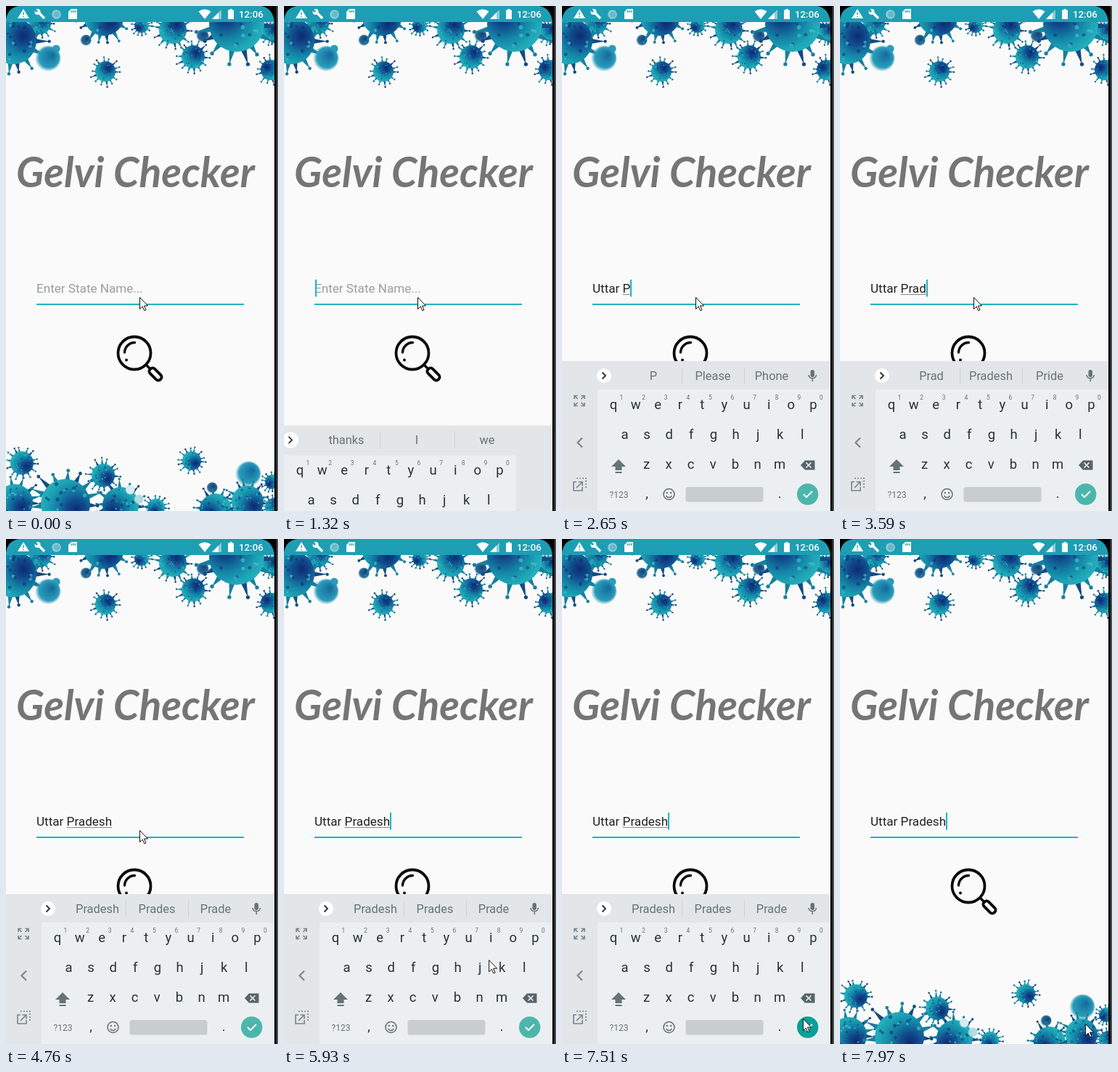
Recreate the animation shown at these times as an HTML page with a canvas. Size 375 by 694 pixels, loop 8000 ms.

```html
<!DOCTYPE html>
<html lang="en">
<head>
<meta charset="utf-8">
<title>State search</title>
<style>
  html, body { margin: 0; width: 100%; height: 100%; overflow: hidden; background: #fafafa; }
  canvas { display: block; }
</style>
</head>
<body>
<canvas width="375" height="694"></canvas>
<script>
const canvas = document.querySelector('canvas');
let ctx = canvas.getContext('2d');
const LOOP = 8000, TAU = Math.PI * 2;
const GREY = '#667378', INK = '#263238', TEAL = '#21b2c2';

// ---------- drawing helpers ----------
function text(str, x, y, size, color, align = 'left', style = '', family = 'Roboto') {
  ctx.font = `${style} ${size}px ${family}, sans-serif`;
  ctx.fillStyle = color;
  ctx.textAlign = align;
  ctx.fillText(str, x, y);
}
function rect(x, y, w, h, color) {
  ctx.fillStyle = color;
  ctx.fillRect(x, y, w, h);
}
function disc(x, y, r, color) {
  ctx.fillStyle = color;
  ctx.beginPath();
  ctx.arc(x, y, r, 0, TAU);
  ctx.fill();
}
function fillPath(d, color, x = 0, y = 0) {
  ctx.save();
  ctx.translate(x, y);
  ctx.fillStyle = color;
  ctx.fill(new Path2D(d), 'evenodd');
  ctx.restore();
}
function strokePath(d, color, width, x = 0, y = 0) {
  ctx.save();
  ctx.translate(x, y);
  ctx.strokeStyle = color;
  ctx.lineWidth = width;
  ctx.stroke(new Path2D(d));
  ctx.restore();
}
function random(seed) {
  return () => {
    seed = (seed * 16807 + 11) % 2147483647;
    return seed / 2147483647;
  };
}

// ---------- static scenery ----------
// shade: direction of the dark side, in turns
function virus(x, y, r, shade = 0.85) {
  const rnd = random(Math.round(x * 91 + y * 37 + 5000));
  const spikes = r > 25 ? 15 : 14;
  for (let i = 0; i < spikes; i++) {
    const a = (i + rnd() * 0.5) / spikes * TAU;
    const reach = r * (1.25 + rnd() * 0.3);
    const c = Math.cos(a), s = Math.sin(a), w = Math.max(1.2, r * 0.11);
    ctx.fillStyle = i % 3 ? '#187f9e' : '#154a80';
    ctx.beginPath();
    ctx.moveTo(x + c * r * 0.92 - s * w, y + s * r * 0.92 + c * w);
    ctx.lineTo(x + c * reach, y + s * reach);
    ctx.lineTo(x + c * r * 0.92 + s * w, y + s * r * 0.92 - c * w);
    ctx.fill();
    disc(x + c * reach, y + s * reach, Math.max(1.3, r * 0.07), ctx.fillStyle);
  }
  const cx = x + Math.cos(shade * TAU) * r * 0.5, cy = y + Math.sin(shade * TAU) * r * 0.5;
  const body = ctx.createRadialGradient(cx, cy, 0, cx, cy, r * 1.5);
  body.addColorStop(0, '#0c2a72');
  body.addColorStop(0.25, '#114a8c');
  body.addColorStop(0.55, '#1483a6');
  body.addColorStop(0.8, '#1ca3b5');
  body.addColorStop(1, '#25b2be');
  disc(x, y, r, body);
  for (let i = 0; i < 22; i++) {
    const a = rnd() * TAU, d = Math.sqrt(rnd()) * r * 0.88;
    disc(x + Math.cos(a) * d, y + Math.sin(a) * d, r * (0.04 + rnd() * 0.04),
      i % 3 ? 'rgba(10,52,108,.6)' : 'rgba(75,200,212,.6)');
  }
}
function softCell(x, y, r, rim = '#2a9cba', core = rim) {
  const glow = ctx.createRadialGradient(x + r * 0.35, y - r * 0.3, 0, x, y, r);
  glow.addColorStop(0, core);
  glow.addColorStop(0.78, rim);
  glow.addColorStop(1, rim + '00');
  disc(x, y, r, glow);
}
function scenery() {
  rect(0, 0, 375, 694, '#fafafa');
  // top cluster
  virus(47, 24, 15);
  virus(10, 48, 32, 0.93);
  softCell(69, 59, 6); softCell(58, 72, 18, '#2a9cba', '#14699b');
  softCell(110, 47, 8, '#2b6c97', '#123f78');
  virus(135, 13, 28, 0.15);
  virus(137, 90, 14);
  virus(187, 27, 10, 0.4);
  softCell(220, 47, 6, '#cfe6ec');
  virus(230, 33, 19);
  softCell(271, 41, 9, '#2b6c97', '#123f78');
  virus(258, 70, 16);
  virus(366, 36, 12);
  virus(318, 25, 38, 0.6);
  virus(365, 88, 14, 0.6);
  // bottom cluster
  virus(22, 628, 16, 0.1);
  virus(12, 682, 25, 0.1);
  virus(134, 645, 16, 0.1);
  virus(158, 686, 25, 0.4);
  virus(82, 684, 34, 0.08);
  softCell(171, 665, 7, '#d8ebef');
  softCell(183, 678, 7, '#b5d9e1');
  virus(207, 689, 12, 0.3);
  virus(256, 625, 13, 0.1);
  softCell(284, 662, 8, '#2b6c97', '#123f78');
  virus(289, 692, 22, 0.4);
  softCell(334, 643, 18, '#2a9cba', '#14699b');
  virus(367, 654, 10, 0.4);
  virus(333, 681, 22, 0.1);
  virus(370, 689, 13);

  text('Gelvi Checker', 14, 249, 57, '#757575', 'left', 'italic 700', 'Lato');
  rect(42, 409, 286, 2, TEAL);
  magnifier();
}
function magnifier() {
  ctx.lineCap = 'round';
  strokePath('M199.5 477a22.5 22.5 0 1 1-45 0a22.5 22.5 0 1 1 45 0', '#0b0b0b', 3.8);
  strokePath('M163.5 476A14 14 0 0 1 177.5 462.5', '#0b0b0b', 3.4);
  strokePath('M193.5 493.5L198 498', '#0b0b0b', 3.4);
  disc(166, 486.5, 2, '#0b0b0b');
  ctx.save();
  ctx.translate(206, 506);
  ctx.rotate(Math.PI / 4);
  ctx.strokeStyle = '#0b0b0b';
  ctx.lineWidth = 3.8;
  ctx.beginPath();
  ctx.roundRect(-10, -4.5, 20, 9, 4);
  ctx.stroke();
  ctx.restore();
  ctx.lineCap = 'butt';
}
function statusBar() {
  rect(0, 0, 371, 22, '#1e9eb4');
  fillPath('M24 4L32 17H16ZM23.3 8.5V12.5H24.7V8.5ZM23.3 14V15.5H24.7V14Z', '#fff');
  strokePath('M44 8L53 17', '#fff', 3.4);
  disc(43.5, 8, 4, '#fff');
  strokePath('M39 4L43 8', '#1e9eb4', 2.6);
  disc(69.5, 11.5, 6.3, '#8bcbd7');
  disc(70, 11.5, 4, '#66b9c9');
  fillPath('M90 4H98V18H86V8ZM90 6V9H91.3V6ZM92.4 6V9H93.7V6ZM94.8 6V9H96.1V6Z', '#fff');
  fillPath('M274 18L265.5 7.5Q274 1.5 282.5 7.5Z', '#fff');
  fillPath('M297 5V18H284Z', '#8bcbd7');
  fillPath('M293 9V18H284Z', '#fff');
  fillPath('M308.5 4H311.5V5.5H314V18H306V5.5H308.5Z', '#fff');
  text('12:06', 321, 16, 13.3, '#fff', 'left', '500');
}
function phoneEdge() {
  fillPath('M0 0H18Q3 2 0 18Z', '#000');
  fillPath('M352 0H375V22H370Q368 3 352 0Z', '#000');
  rect(370, 0, 3, 694, '#0a0a0a');
  rect(373, 0, 2, 694, '#4b4b4b');
}

// ---------- keyboard ----------
function keyRow(letters, x, baseline) {
  [...letters].forEach((ch, i) => text(ch, x + i * 30.6, baseline, 18.5, INK, 'center'));
}
function suggestions(words, docked) {
  const centers = docked ? [126, 208, 289] : [135, 232, 329];
  const y = docked ? 0 : -2;
  words.forEach((word, i) => text(word, centers[i], 514 + y, 16.4, GREY, 'center'));
  for (const x of docked ? [165, 251] : [181, 284]) rect(x, 497 + y, 1, 22, '#cbd1d4');
  if (docked) {
    ctx.beginPath();
    ctx.roundRect(342.5, 500, 5.5, 10, 2.7);
    ctx.fillStyle = GREY;
    ctx.fill();
    strokePath('M340 507A5.3 5.3 0 0 0 350.5 507M345.3 512.5V516', GREY, 1.6);
  }
  disc(58, 508 + y, docked ? 10 : 11, '#fff');
  strokePath('M55.5 503.5L60 508L55.5 512.5', INK, 1.8, 0, y);
}
function sidePanel() {
  for (const [sx, sy] of [[-1, -1], [1, -1], [-1, 1], [1, 1]]) {
    ctx.save();
    ctx.translate(24, 542.5);
    ctx.scale(sx, sy);
    strokePath('M2.5 2.5L7 7M7 2.5V7H2.5', '#7c878b', 1.7);
    ctx.restore();
  }
  strokePath('M28 593.5L21.5 600L28 606.5', '#7c878b', 2.2);
  ctx.setLineDash([2, 2]);
  strokePath('M20 649H33V662', '#7c878b', 1.7);
  ctx.setLineDash([]);
  strokePath('M20 654H16V666H28V661M20 662L28 654M22.5 654H28V659.5', '#7c878b', 1.7);
}
function keyboard(offset, docked, words, pressed) {
  ctx.save();
  ctx.beginPath();
  ctx.rect(0, 0, 370, 694);
  ctx.clip();
  ctx.translate(0, offset);
  rect(0, docked ? 488 : 486, 370, 210, '#e2e6e9');
  if (docked) sidePanel();
  else ctx.translate(-49, 0);
  rect(49, 527, docked ? 321 : 320, 167, '#eceff1');
  suggestions(words, docked);

  keyRow('qwertyuiop', 71, 554);
  for (let i = 0; i < 10; i++) text((i + 1) % 10, 82 + i * 30.6, 541, 8.5, GREY, 'center');
  keyRow('asdfghjkl', 86.5, 595);
  keyRow('zxcvbnm', 116.5, 636);
  fillPath('M78 623L88 633H82.5V638H73.5V633H68ZM73.5 640H82.5V642H73.5Z', GREY);
  fillPath('M335 624.5H348.5V637.5H335L329 631Z', '#56646a');
  strokePath('M336.5 627.5L343.5 634.5M343.5 627.5L336.5 634.5', '#eceff1', 1.7);

  text('?123', 78.5, 675.5, 12, GREY, 'center');
  text(',', 117, 676, 18, INK, 'center');
  text('.', 300, 676, 18, INK, 'center');
  strokePath('M155 671A7.5 7.5 0 1 1 140 671A7.5 7.5 0 1 1 155 671M143.5 673Q147.5 678 151.5 673', GREY, 1.6);
  disc(144.8, 669, 1.2, GREY);
  disc(150.2, 669, 1.2, GREY);
  ctx.beginPath();
  ctx.roundRect(170.5, 661, 107, 20.5, 3);
  ctx.fillStyle = '#c8cdd0';
  ctx.fill();
  disc(338.7, 671, 14.7, pressed ? '#05a097' : '#4db6ac');
  strokePath('M333 671L337 675L345 667', '#fff', 1.8);
  ctx.restore();
}

// ---------- timeline ----------
// time, finished words, word being composed, suggestions
const typing = [
  [0, '', '', ['thanks', 'I', 'we']],
  [1480, '', 'U', ['thanks', 'I', 'we']],
  [1650, '', 'Ut', ['Ut', 'Utah', 'Utility']],
  [1720, '', 'Utt', ['Utt', 'Uttar', 'Utter']],
  [1800, '', 'Utta', ['Utta', 'Uttar', 'Uttam']],
  [1870, '', 'Uttar', ['Uttar', 'Uttara', 'Utter']],
  [2270, 'Uttar ', '', ['Pradesh', 'and', 'Pradeep']],
  [2650, 'Uttar ', 'P', ['P', 'Please', 'Phone']],
  [2970, 'Uttar ', 'Pr', ['Pr', 'Pradesh', 'Problem']],
  [3270, 'Uttar ', 'Pra', ['Pra', 'Pradesh', 'Pray']],
  [3590, 'Uttar ', 'Prad', ['Prad', 'Pradesh', 'Pride']],
  [3810, 'Uttar ', 'Prade', ['Prade', 'Pradesh', 'Parade']],
  [4060, 'Uttar ', 'Prades', ['Prades', 'Pradesh', 'Prade']],
  [4210, 'Uttar ', 'Pradesh', ['Pradesh', 'Prades', 'Prade']],
  [7730, 'Uttar Pradesh', '', ['Pradesh', 'Prades', 'Prade']]
];
const caretToggles = [450, 4760, 5300, 6000, 6450];
const pointerPath = [
  [0, 184, 400], [4830, 184, 400], [5060, 168, 455], [5210, 168, 455], [5380, 169, 457],
  [5450, 169, 457], [5930, 282, 578], [6320, 347, 659], [6660, 350, 665], [6730, 350, 665],
  [7090, 191, 531], [7440, 332, 659], [7660, 332, 659], [7970, 338, 666], [LOOP, 338, 666]
];

function pointerAt(t) {
  const i = pointerPath.findIndex(p => p[0] > t);
  const [t0, x0, y0] = pointerPath[i - 1], [t1, x1, y1] = pointerPath[i];
  const k = (t - t0) / (t1 - t0);
  return [x0 + (x1 - x0) * k, y0 + (y1 - y0) * k];
}
function keyboardOffset(t) {
  if (t < 1320 || t >= 7960) return null;
  if (t < 1480) return 206 * ((1480 - t) / 240) ** 2;
  return t < 7730 ? 0 : 206 * ((t - 7650) / 310);
}
function field(t, done, composing) {
  const value = done + composing;
  text(value || 'Enter State Name...', 42, 394, 17.1, value ? '#212121' : '#9c9c9c');
  const end = value ? 42 + ctx.measureText(value).width : 42.5;
  const start = 42 + ctx.measureText(done).width;
  if (composing) rect(start, 396, end - start, 1, '#8c8c8c');
  if (caretToggles.filter(c => c <= t).length % 2) rect(Math.round(end), 376, 2, 23.5, TEAL);
}

const backdrop = document.createElement('canvas');
backdrop.width = canvas.width;
backdrop.height = canvas.height;
const screenCtx = ctx;
ctx = backdrop.getContext('2d');
scenery();
statusBar();
ctx = screenCtx;

const started = performance.now();
function render() {
  const t = (performance.now() - started) % LOOP;
  const [, done, composing, words] = typing.findLast(step => step[0] <= t);
  ctx.drawImage(backdrop, 0, 0);
  field(t, done, composing);
  const offset = keyboardOffset(t);
  if (offset !== null) keyboard(offset, t >= 1650, words, t >= 7510);
  phoneEdge();
  const [x, y] = pointerAt(t), arrow = 'M.5 .5V16.5L4.2 13L6.8 18.7L9 17.7L6.5 12H11.5Z';
  fillPath(arrow, '#fff', x, y);
  strokePath(arrow, '#111', 1, x, y);
  requestAnimationFrame(render);
}
render();
</script>
</body>
</html>
```
